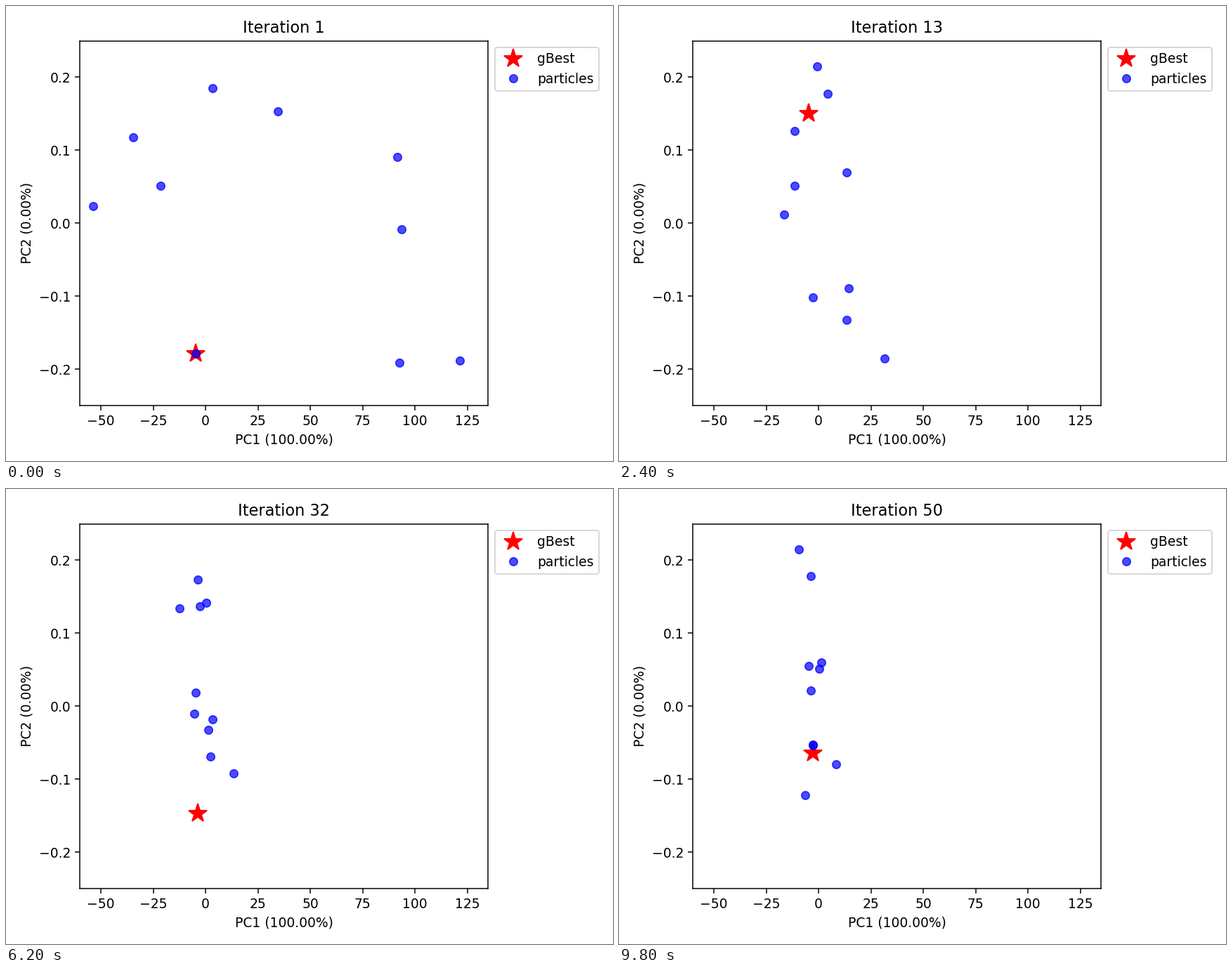
Write a matplotlib script that moves like this. It is 864 px wide and 648 px high and loops after 10 s.

```python
import numpy as np
import matplotlib.pyplot as plt
from matplotlib.animation import FuncAnimation

W, H, DPI = 864, 648, 135
FRAMES, STEP_MS = 50, 200
OFFSET = -0.55   # PC1 values sit on an integer grid shifted by the mean
SETTLE = 8       # iterations in which the spread in PC1 falls to a third
LOW, HIGH = -0.185, 0.215

# Where each particle starts and where it has settled at the end.
START = np.array([(-53, .023), (-34, .118), (-21, .051), (4, .185), (35, .153),
                  (92, .091), (94, -.008), (93, -.191), (122, -.188), (-4, -.179)])
END = np.array([(-3, .178), (-4, .055), (-9, .215), (1, .051), (2, .060),
                (-2, -.053), (-6, -.122), (-3, .021), (9, -.080), (-2, -.054)])

# The best position holds until a better one is found.
BEST = {0: (-4, -.179), 7: (-4, .150), 13: (-3, -.157), 20: (-3, -.147), 43: (-2, -.064)}

rng = np.random.default_rng(4)
count = len(START)
phase = rng.uniform(0, 2 * np.pi, (count, 2))
rate = rng.uniform(0.3, 0.6, (count, 2))
reach = rng.uniform((1, 0.03), (7, 0.10), (count, 2))


def swarm(frame):
    """PC1 collapses towards the centre while PC2 keeps swinging."""
    u = frame / (FRAMES - 1)
    swing = reach * np.sqrt(abs(np.sin(np.pi * u))) * np.sin(phase + rate * frame)
    left = np.array([np.exp(-frame / SETTLE), 1 - u])
    x, y = (END + (START - END) * left + swing).T
    if 0 < u < 1:
        y = np.clip(y, LOW, HIGH)
    return np.round(x) + OFFSET, y


fig, ax = plt.subplots(figsize=(W / DPI, H / DPI), dpi=DPI)
ax.set(xlim=(-60, 135), ylim=(-0.25, 0.25),
       xlabel="PC1 (100.00%)", ylabel="PC2 (0.00%)")
title = ax.set_title("Iteration 1")
star, = ax.plot([], [], "r*", markersize=15, label="gBest")
dots, = ax.plot([], [], "bo", alpha=0.7, label="particles")
ax.legend(loc="upper left", bbox_to_anchor=(1, 1))
fig.tight_layout()


def update(frame):
    x, y = BEST[max(t for t in BEST if t <= frame)]
    star.set_data([x + OFFSET], [y])
    dots.set_data(*swarm(frame))
    title.set_text(f"Iteration {frame + 1}")
    return star, dots, title


anim = FuncAnimation(fig, update, frames=FRAMES, interval=STEP_MS,
                     repeat=True, repeat_delay=0)
plt.show()
```
